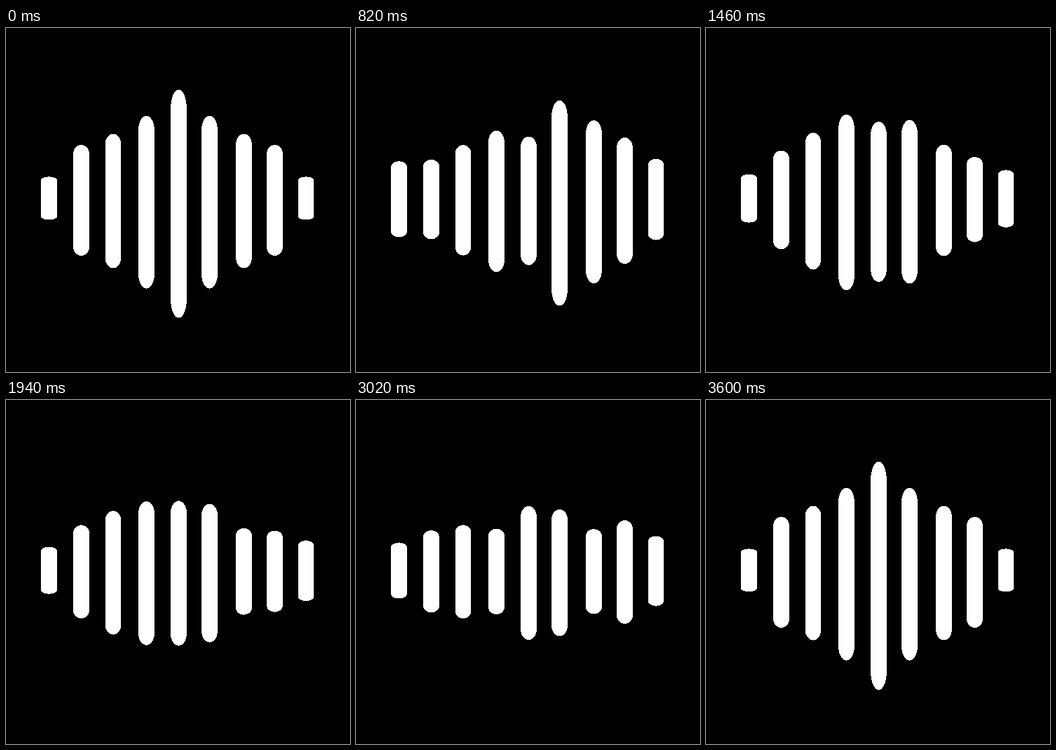
Write an HTML page that moves like this. It is 512 px wide and 512 px high and loops after 3620 ms.

```html
<!DOCTYPE html>
<html>
<head>
<meta charset="utf-8">
<style>
  html, body { margin: 0; width: 100%; height: 100%; overflow: hidden; background: #000; }
  svg { display: block; width: 100vw; height: 100vh; }
</style>
</head>
<body>
<svg viewBox="0 0 512 512" fill="#fff" shape-rendering="crispEdges"></svg>
<script>
const LOOP = 3620, WIDTH = 23.7, MIDDLE = 251.5;
const centres = [64, 112, 159.5, 209, 257, 303, 354, 400, 446.5];

// A pose gives heights at key bars; the bars between follow a straight line.
const rise = [64, 165, 200, 257, 340];
const diamond = [...rise, ...rise.slice(0, -1).reverse()];
const poses = {
  0: diamond,
  655: { 0: 124, 1: 111, 3: 197, 4: 179, 5: 322, 7: 204, 8: 130 },
  1630: { 0: 61, 1: 154, 3: 275, 5: 227, 6: 145, 8: 76 },
  2720: { 0: 93, 2: 107, 3: 60, 4: 126, 5: 153, 6: 88, 7: 148, 8: 125 },
  3600: diamond,
};

// Linear interpolation between the numeric keys of `points`, held past the last.
function between(points, at, read = value => value) {
  const keys = Object.keys(points).map(Number);
  const next = keys.findIndex(key => key >= at);
  if (next < 0) return read(points[keys.at(-1)]);
  if (keys[next] === at) return read(points[at]);
  const a = keys[next - 1], b = keys[next];
  const from = read(points[a]), to = read(points[b]);
  return from + (to - from) * (at - a) / (b - a);
}

const bars = centres.map(x => {
  const bar = document.createElementNS('http://www.w3.org/2000/svg', 'rect');
  bar.setAttribute('x', x - WIDTH / 2);
  bar.setAttribute('width', WIDTH);
  bar.setAttribute('rx', WIDTH / 2);
  document.querySelector('svg').append(bar);
  return bar;
});

function draw(t) {
  bars.forEach((bar, i) => {
    const height = between(poses, t, pose => between(pose, i));
    // Bars stretch about a point slightly above their middle, caps included.
    bar.setAttribute('y', MIDDLE - height * 0.47);
    bar.setAttribute('height', height);
    bar.setAttribute('ry', height * 0.08);
  });
}

const start = performance.now();
function tick() {
  draw((performance.now() - start) % LOOP);
  requestAnimationFrame(tick);
}
tick();
</script>
</body>
</html>
```
